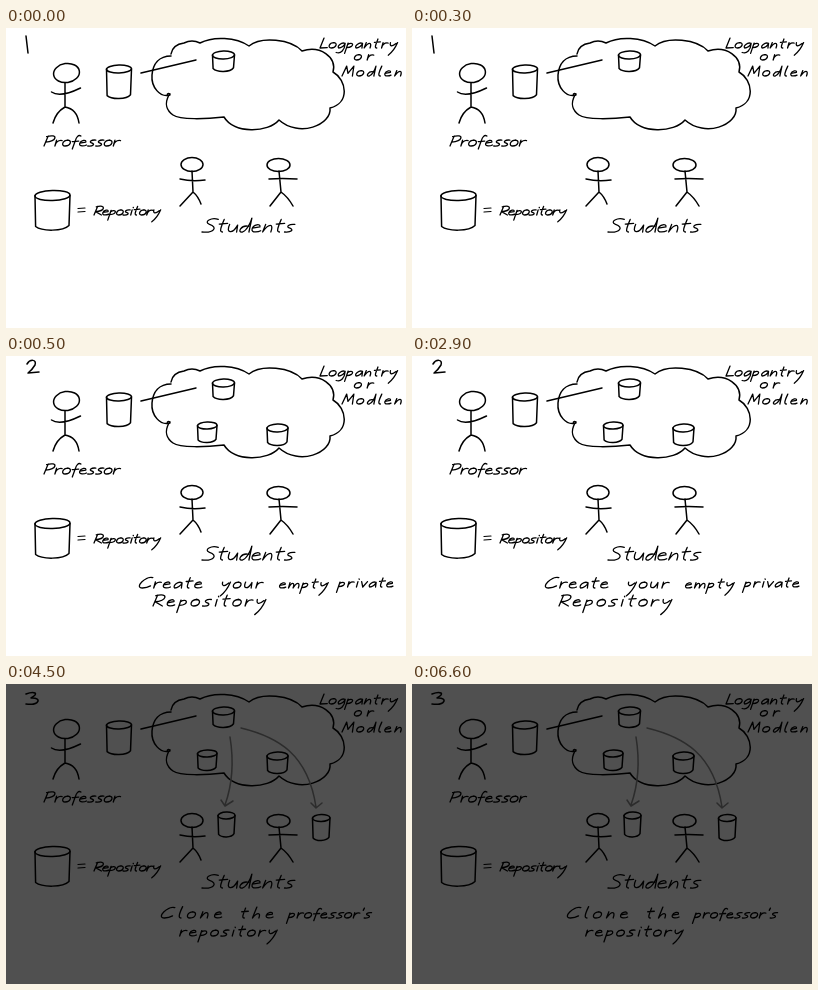
An HTML page with a canvas that plays this animation: 400x300 px, repeating every 8000 ms.

```html
<!DOCTYPE html>
<html lang="en">
<head>
<meta charset="utf-8">
<title>Class repositories</title>
<style>
html, body { margin: 0; width: 100%; height: 100%; overflow: hidden; background: #fff; }
canvas { display: block; width: 400px; height: 300px; }
</style>
</head>
<body>
<canvas id="stage" width="400" height="300" role="img" aria-label="A professor and students sharing repositories"></canvas>
<script>
const ctx = document.getElementById('stage').getContext('2d');
const LOOP = 8000, INK = '#000';

// Handwriting: broad, low and slightly slanted.
const WIDE = 1.3, LOW = 0.9, SLANT = 0.25;

// Pen strokes of each letter: [advance, path]; baseline 0, x-height 6.
const PEN = {
  a: [5.5, 'M5-5C2-7-1-2 1 0C3 0 5-3 5-5L5.5 0'],
  c: [4.5, 'M4.5-5C2-7-2 0 4.5-.5'],
  d: [5.5, 'M4.5-4.5C0-6-1 1 2 0C4-1 5-7 5-11L5.5 0'],
  e: [5, 'M0-3L4-4C4-7 0-6 0-2.5C0 1 4 0 5-1'],
  f: [4.5, 'M5-10C3-12 2-9 2-5L1.5 3M0-4.5L4.5-5'],
  g: [5, 'M5-5C2-7-1-2 1 0C3 0 5-3 5-5C6 2 4 7 0 5'],
  h: [5, 'M1-11L0 0C2-6 5-6 4.5 0'],
  i: [2, 'M1-6L1 0M1.3-9L1.5-8.5'],
  l: [2, 'M1-11C0-4 0 0 2 0'],
  m: [7.5, 'M0-6L0 0C1-7 4-7 3.5 0C5-7 8-7 7.5 0'],
  n: [5, 'M.5-6L0 0C2-7 5-7 4.5 0'],
  o: [5, 'M3-6C-1-6-1 0 2 0C6 0 6-6 2.5-6'],
  p: [5, 'M.5-5.5L0 6M.5-4C4-8 7-1 .5-.5'],
  r: [4.5, 'M.5-6L.5 0C.5-4 2-6 4.5-5.5'],
  s: [4.5, 'M4.5-6C1-6.5 0-4 2-3.2C5-2 4 .5 0 0'],
  t: [4.5, 'M2-10C1.5-4 1 0 3 0M0-6.3L4.5-6.8'],
  u: [5, 'M0-6C-1 1 3 2 4.5-5.5L5 0'],
  v: [4.5, 'M0-6L2 0L4.5-6'],
  y: [5.5, 'M0-6C0-2 2-1 4.5-5M5.5-6C5-1 4 4 1 8'],
  "'": [1.5, 'M1-11L.6-8.5'],
  C: [8, 'M8-10C3-12-3 0 3 0C5 0 7-1 8-2'],
  L: [5, 'M1-11L0 0L5.5-.5'],
  M: [8, 'M0 0L1.5-11L4-3L7-11L8 0'],
  P: [6, 'M1-10L0 0M0-9.5C8-13 8-4 .5-4'],
  R: [6, 'M1-10L0 0M0-9.5C8-13 8-4 .5-4L6 0'],
  S: [7, 'M7-10C3-12-1-8 3-6C8-4 7 1 0 0']
};
for (const k in PEN) PEN[k][1] = new Path2D(PEN[k][1]);

function stroke(path, width = 1.5, color = INK) {
  ctx.lineWidth = width;
  ctx.strokeStyle = color;
  ctx.stroke(typeof path === 'string' ? new Path2D(path) : path);
}

function write(text, x, y, size, gap) {
  const word = new Path2D();
  for (const ch of text) {
    const [advance, path] = PEN[ch];
    word.addPath(path, new DOMMatrix([WIDE * size, 0, -SLANT * size, LOW * size, x, y]));
    x += advance * WIDE * size + gap;
  }
  stroke(word, 1.3);
}

function oval(x, y, rx, ry, turn = 0) {
  const path = new Path2D();
  path.ellipse(x, y, rx, ry, turn, 0, 2 * Math.PI);
  stroke(path);
}

// Repository drum inside the box x, y, w, h; e is the lid's half height.
function drum(x, y, w, h, e) {
  const r = x + w, b = y + h;
  oval(x + w / 2, y + e, w / 2, e, -0.03);
  stroke(`M${x} ${y + e}L${x + .6} ${b - e * .6}C${x + w * .2} ${b + e * .4} ${x + w * .8} ${b + e * .4} ${r - 1} ${b - e * .8}L${r} ${y + e}`);
}

function cloud() {
  stroke('M164 66C160 64 161 69 164 67C154 70 145 59 146 47C147 36 153 28 165 28'
    + 'M165 26C166 20 171 16 178 15C184 12 190 13 194 15C207 8 230 9 243 18'
    + 'C255 8 285 11 296 23C314 17 331 29 327 44C341 52 344 75 324 80'
    + 'C326 97 293 110 273 92C262 105 228 106 218 89C200 91 174 92 167 87C161 83 158 76 163 67');
}

function people() {
  oval(60.5, 45, 13, 9.5, -0.15);
  stroke('M59 55L59 79M45.5 64Q54 70 74.5 60M59 79Q50 84 47 95M59 79Q71 81 73 95');
  oval(186, 136.5, 11, 7);
  stroke('M186 143L187 164M174 151Q186 154 199 152M187 164L174 178M187 164Q192 168 195 176');
  oval(272.5, 137, 11.5, 6.5);
  stroke('M273 143L275 164M263 151Q276 150 291 151M275 164L264 178M275 164Q282 169 287 178');
}

function base() {
  people();
  cloud();
  drum(100.5, 37, 25, 33, 4);
  drum(206.5, 23, 22, 20, 4);
  drum(29, 162.5, 35, 39, 5);
  stroke('M135 45L190 32');
  stroke('M72 180.5L79 180M72 184L79 183.5', 1.2);
  write('Professor', 38, 118, 1.1, 1.6);
  write('Repository', 88, 187, .95, .8);
  write('Students', 196, 204, 1.4, 2.3);
  write('Logpantry', 314, 20, 1, 2.2);
  write('or', 348, 32, 1, 6);
  write('Modlen', 336, 48, 1, 3.9);
}

function studentRepos() {
  drum(191.5, 66, 19.5, 20, 3.5);
  drum(261, 68, 21, 21, 4);
}

function createStep() {
  stroke('M21 8C24 3 31 3 29 9Q26 14 22 17L33 16');
  studentRepos();
  write('Create', 132, 232, 1.15, 3);
  write('your', 215, 232, 1.1, 4);
  write('empty', 273, 232, 1, 3);
  write('private', 332, 231, 1, 2.4);
  write('Repository', 147, 250, 1.2, 4.2);
}

function cloneStep() {
  const gray = '#2c2c2c';
  stroke('M20 10C28 7 34 9 25 14C36 13 34 22 20 20');
  studentRepos();
  drum(212, 128, 17, 24.5, 3.5);
  drum(306.5, 130.5, 17.5, 25.5, 3.5);
  stroke('M224 53Q230 90 219 121M215 116L219 122L227 117', 1.5, gray);
  stroke('M235 44C272 53 302 70 310 123M305 119L310 124L316 119', 1.5, gray);
  write('Clone', 154, 234, 1.15, 6);
  write('the', 234, 234, 1.1, 6);
  write("professor's", 282, 234, 1, 1.9);
  write('repository', 173, 252, 1.1, 3.5);
}

function draw(t) {
  const dimmed = t >= 4500;
  ctx.fillStyle = dimmed ? '#505050' : '#fff';
  ctx.fillRect(0, 0, 400, 300);
  ctx.lineCap = ctx.lineJoin = 'round';
  base();
  if (t < 500) stroke('M20 8L22 25');
  else if (dimmed) cloneStep();
  else createStep();
}

const start = performance.now();
function tick() {
  draw((performance.now() - start) % LOOP);
  requestAnimationFrame(tick);
}
tick();
</script>
</body>
</html>
```
